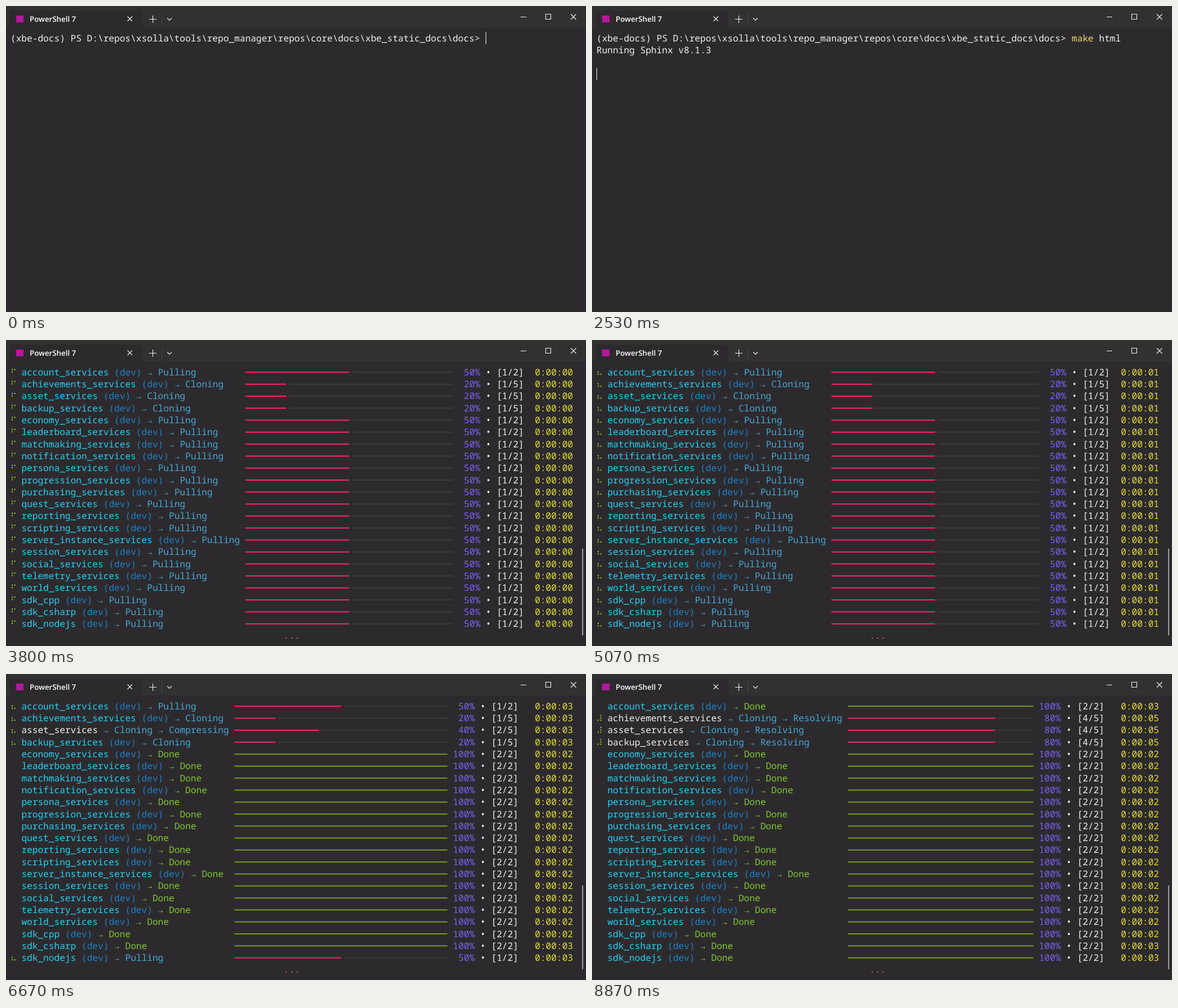
Recreate the animation shown at these times as an HTML page. Size 1029 px wide and 544 px high, loop 8940 ms.

```html
<!DOCTYPE html>
<html lang="en">
<head>
<meta charset="utf-8">
<title>Terminal build</title>
<style>
  html, body { margin: 0; width: 100%; height: 100%; overflow: hidden; background: #2d2a2e; }
  svg { display: block; width: 1029px; height: 544px; }
  text { white-space: pre; text-rendering: geometricPrecision; }
  #screen { font: 16.15px "Noto Sans Mono", "DejaVu Sans Mono", monospace; }
  .icon { fill: none; stroke: #f2f2f2; stroke-width: 1.1; }
</style>
</head>
<body>
<svg viewBox="0 0 1029 544">
  <rect width="1029" height="544" fill="#2d2a2e"/>
  <rect width="1029" height="38" fill="#313131"/>
  <path d="M2 38q4 0 4-4V16q0-8 8-8H234q8 0 8 8V34q0 4 4 4z" fill="#2d2a2e"/>
  <rect x="18" y="17" width="13" height="12" fill="#b5179e"/>
  <text x="42" y="28.3" fill="#fff" font-family="'Open Sans', sans-serif" font-weight="600" font-size="13.3">PowerShell 7</text>
  <path class="icon" d="M215.5 18.5l8.5 8.5m0-8.5l-8.5 8.5M254 23.5h13M260.5 17v13M286 21.500l4 4 4-4M913 19.500h10M957.500 14.500h9v9h-9zM1002 14.500l9.500 9.500m0-9.500l-9.500 9.500"/>
  <path d="M276.500 12v23" stroke="#454545"/>
  <g id="screen"></g>
</svg>
<script>
const LOOP = 8940, CELL = 9.69, LINE = 21.3, LEFT = 8;
const C = {
  white: '#f0f0f0', yellow: '#f0dc6a', ghost: '#747176', name: '#22d3f5', branch: '#1b82c9',
  action: '#45a9d6', done: '#80c92e', pct: '#7d60f0', time: '#e2dc35',
  bar: '#f92672', track: '#3d3b3e', full: '#729c1f', dots: '#8fd128', more: '#e2708f'
};

const PROMPT = String.raw`(xbe-docs) PS D:\repos\xsolla\tools\repo_manager\repos\core\docs\xbe_static_docs\docs> `;
const COMMAND = 'make html';
const LOG = String.raw`
Running Sphinx v8.1.3

[conf.py::repo_manifest] Manifest macro ver: 'v2024.08.0'
[conf.py::repo_manifest] Manifest num repos found: 30
[conf.py::repo_manifest] Manifest stage: 'dev_stage'
[conf.py::RTD] is_read_the_docs_build: False
[conf.py::sphinxcontrib.redoc] Build from redoc[0].spec: _static/specs/openapi.json
[conf.py::sphinxcontrib.redoc] Displaying at redoc[0].page: content/-/api/index


loading translations [en]... done
C:\users\tovin\miniconda3\envs\xbe-docs\lib\site-packages\breathe\project.py:116: RemovedInSphinx90Warn
ing: Sphinx 9 will drop support for representing paths as strings. Use "pathlib.Path" or "os.fspath" in
stead.
  self._default_build_dir = os.path.dirname(app.doctreedir.rstrip(os.sep))
[sphinx_algolia_crawler::setup] Extension loaded with version: 1.0.2
[sphinx_image_min::setup] Extension loaded with version: 1.0.4
[sphinx_openapi::setup] Extension loaded with version: 1.0.3

[sphinx_repo_manager::setup] Extension loaded with version: 1.0.10`.split('\n');

const REPOS = [...('account achievements asset backup economy leaderboard matchmaking notification persona ' +
  'progression purchasing quest reporting scripting server_instance session social telemetry world')
  .split(' ').map(n => n + '_services'), 'sdk_cpp', 'sdk_csharp', 'sdk_nodejs'];

const KEYS = [1070, 1130, 1270, 1330, 1600, 1670, 1730, 1800, 1870];
// time, visible log lines, cursor row (-1 hides it), scrolled rows
const OUTPUT = [
  [2200, 1, 1, 0], [2530, 2, 3, 0], [2600, 12, 12, 0], [2800, 12, -1, 0], [3000, 19, 19, 0],
  [3070, 19, 20, 0], [3270, 21, 21, 0], [3330, 21, -1, 0], [3600, 21, -1, 2]
];
const PROGRESS = 3800, TASK_START = 3660, SPIN_START = 3730;
const TICKS = [
  3800, 3930, 4070, 4200, 4330, 4470, 4670, 4800, 4930, 5070, 5200, 5330, 5470, 5600, 5730, 5870,
  6000, 6130, 6270, 6400, 6530, 6670, 6800, 6870, 6930, 7070, 7200, 7330, 7470, 7600, 7730, 7800,
  8000, 8130, 8200, 8330, 8470, 8600, 8670, 8730, 8870
];
const STEPS = [0, 330, 930, ...KEYS, ...OUTPUT.map(o => o[0]), ...TICKS];
const COMPRESS_AT = { 1: 7200, 2: 6530, 3: 7200 }, RESOLVE_AT = 8600;
const DONE_AT = { 0: 6800, 20: 6670, 21: 6930 };

const colX = col => LEFT + col * CELL;
const rect = (x, y, w, h, fill) => `<rect x="${x}" y="${y}" width="${w}" height="${h}" fill="${fill}"/>`;
const put = (col, row, str, fill) => str.trim()
  ? `<text x="${colX(col)}" y="${62.8 + row * LINE}" fill="${fill}">${str.replace(/>/g, '&gt;')}</text>` : '';
const cursor = (col, row) => rect(Math.round(colX(col)), Math.round(46.4 + row * LINE), 1, 22, C.white);
const scrollbar = top => rect(1022, top, 2, 525 - top, '#a09ea1');

function drawPrompt(row, typed) {
  const col = PROMPT.length;
  return put(0, row, PROMPT, C.white) +
    put(col, row, COMMAND.slice(0, Math.min(typed, 4)), C.yellow) +
    put(col + 5, row, COMMAND.slice(5, Math.max(typed, 5)), C.white) +
    (typed ? put(col + typed, row, COMMAND.slice(typed), C.ghost) : '');
}

function drawTyping(t) {
  const typed = KEYS.filter(k => k <= t).length;
  const blinkOff = t >= 330 && t < 930;
  return drawPrompt(0, typed) + (blinkOff ? '' : cursor(PROMPT.length + typed, 0));
}

function drawOutput(t) {
  const [, count, cursorRow, scroll] = OUTPUT.filter(o => o[0] <= t).pop();
  let out = scroll ? scrollbar(92) : drawPrompt(0, COMMAND.length);
  for (let i = Math.max(1, scroll); i < count; i++) out += put(0, i - scroll, LOG[i], C.white);
  return out + (cursorRow < 0 ? '' : cursor(0, cursorRow));
}

function task(i, t) {
  const name = REPOS[i], branch = [' (dev)', C.branch];
  if (COMPRESS_AT[i]) {
    if (t < COMPRESS_AT[i])
      return { parts: [[name, C.name], branch, [' → Cloning', C.action]], at: 1, of: 5, end: t };
    const late = t >= RESOLVE_AT;
    return {
      parts: [[name, C.white], [' → Cloning', C.action], [late ? ' → Resolving' : ' → Compressing', C.action]],
      at: late ? 4 : 2, of: 5, end: t
    };
  }
  const doneAt = DONE_AT[i] || (i < 13 ? 6400 : 6530), done = t >= doneAt;
  return {
    parts: [[name, C.name], branch, done ? [' → Done', C.done] : [' → Pulling', C.action]],
    at: done ? 2 : 1, of: 2, end: done ? doneAt : t
  };
}

function drawSpinner(row, t) {
  const glyph = '⠋⠙⠹⠸⠼⠴⠦⠧⠇⠏'.charCodeAt(Math.floor((t - SPIN_START) / 80) % 10);
  let out = '';
  for (let bit = 0; bit < 6; bit++)
    if (glyph >> bit & 1)
      out += rect(bit < 3 ? 10 : 14.6, 51.4 + bit % 3 * 4.2 + row * LINE, 2.1, 2.1, C.dots);
  return out;
}

function drawBar(row, from, to, frac) {
  const y = 56.3 + row * LINE, halves = Math.floor((to - from) * 2 * frac + 1e-6);
  const line = (a, b, fill) => rect(colX(a), y, (b - a) * CELL, 2, fill);
  if (frac === 1) return line(from, to, C.full);
  return line(from, from + halves / 2, C.bar) + line(from + (halves + 1) / 2, to, C.track);
}

function drawProgress(t) {
  const tasks = REPOS.map((_, i) => task(i, t));
  const shift = tasks.some(k => k.at === k.of) ? 1 : 0;
  const width = k => k.parts.reduce((n, p) => n + p[0].length, 0);
  const barFrom = 3 + Math.max(...tasks.map(width));
  let out = scrollbar(shift ? 376 : 371) + put(50, 22, '...', C.more);
  tasks.forEach((k, row) => {
    const frac = k.at / k.of, pct = frac * 100 + '%';
    let col = 2;
    for (const [str, fill] of k.parts) {
      const [arrow, word] = str.startsWith(' →') ? [' →', str.slice(3)] : ['', str];
      if (arrow) out += put(col + 1, row, '→', fill);
      out += put(col + (arrow ? 3 : 0), row, word, fill);
      col += str.length;
    }
    if (frac < 1) out += drawSpinner(row, t);
    out += drawBar(row, barFrom, 81 - shift, frac) +
      put(86 - shift - pct.length, row, pct, C.pct) +
      put(87 - shift, row, '•', C.white) +
      put(89 - shift, row, `[${k.at}/${k.of}]`, C.white) +
      put(96, row, '0:00:0' + Math.floor((k.end - TASK_START) / 1000), C.time);
  });
  return out;
}

const screenEl = document.getElementById('screen');
const start = performance.now();
let shown = -1;

function frame() {
  const now = Math.max(0, performance.now() - start) % LOOP;
  const step = STEPS.filter(s => s <= now).pop();
  if (step !== shown) {
    shown = step;
    const draw = step < OUTPUT[0][0] ? drawTyping : step < PROGRESS ? drawOutput : drawProgress;
    screenEl.innerHTML = draw(step);
  }
  requestAnimationFrame(frame);
}
frame();
</script>
</body>
</html>
```
